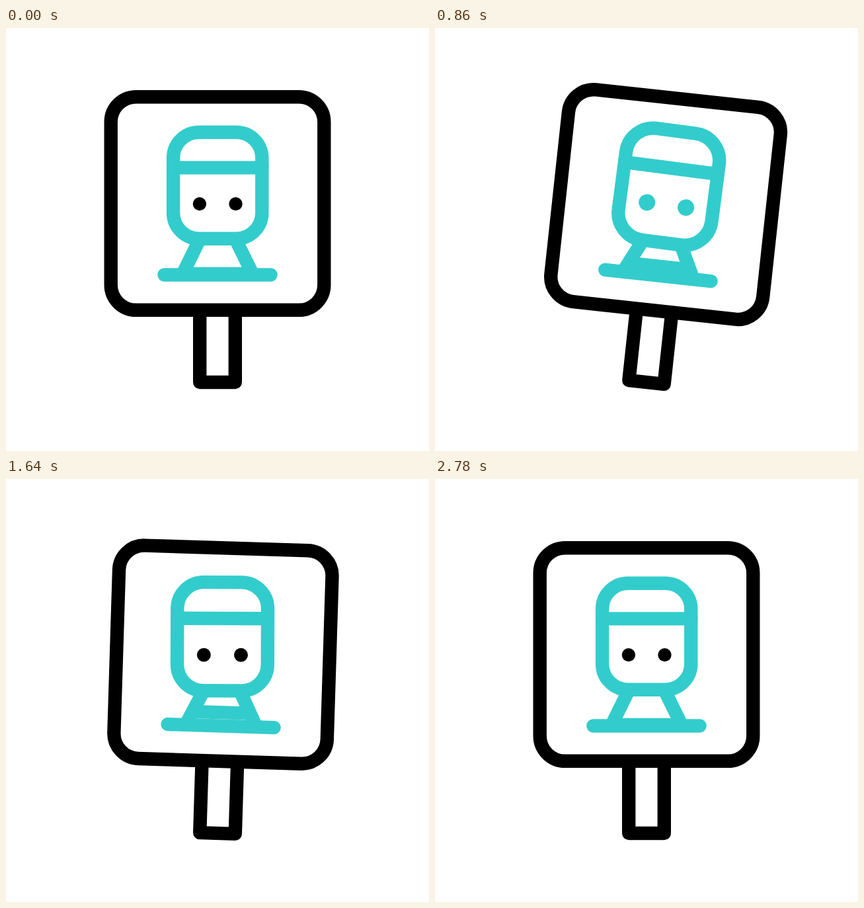
These frames come from a looping animation (640 px wide and 640 px high, 3360 ms). An HTML page:

```html
<!DOCTYPE html>
<html lang="en">
<head>
<meta charset="utf-8">
<title>Train sign</title>
<style>
  html, body { margin: 0; width: 100%; height: 100%; overflow: hidden; background: #fff; }
  svg { display: block; width: 100vw; height: 100vh; }
  .line { fill: none; stroke-width: 20.4; stroke-linejoin: round; }
  .ink { stroke: #000; }
  .teal { stroke: #33cccc; }
  .round { stroke-linecap: round; }
</style>
</head>
<body>
<svg viewBox="0 0 640 640">
  <g id="sign">
    <path class="line ink" d="M293.2 426V536H346.8V426"/>
    <rect class="line ink" x="158.7" y="104.2" width="322.6" height="322.6" rx="38"/>
    <path class="line teal" id="sleeper"/>
    <path class="line teal" d="M293.4 319L266.9 373M347 319L373.5 373"/>
    <path class="line teal round" d="M239.4 373.5H400.6"/>
    <g id="train">
      <rect class="line teal" id="body" style="fill:#fff"/>
      <path class="line teal round" id="sill"/>
      <circle id="eyeL"/>
      <circle id="eyeR"/>
    </g>
  </g>
</svg>
<script>
const LOOP = 3360, STEP = 20, END = 2780;
const CX = 320.2, CY = 238.2;
const $ = id => document.getElementById(id);
const set = (id, attrs) => {
  for (const k in attrs) $(id).setAttribute(k, attrs[k]);
};

// [time, degrees]
const SWING = [[0, 0], [315, 0], [910, 6.3], [1346, -5.1], [1706, 2.45], [1960, -1.5], [2180, 0]];
const WOBBLE = [[0, 0], [260, 1.7], [530, -1.7], [800, 1.7], [1070, -1.7], [1340, 1.7],
  [1610, -1.7], [1880, 1.7], [2150, -1.7], [2420, 1.7], [END, 0]];

const smooth = u => u * u * (3 - 2 * u);

function ease(keys, t) {
  const i = keys.findIndex(k => k[0] > t);
  if (i < 0) return keys[keys.length - 1][1];
  const [t0, a] = keys[i - 1], [t1, b] = keys[i];
  return a + (b - a) * smooth((t - t0) / (t1 - t0));
}

// The sleeper slides from under the train to the rail, six times.
function sleeperY(t) {
  const from = 140, cycle = 415;
  if (t < from || t >= from + 6 * cycle) return 372;
  const u = (t - from) % cycle / cycle;
  return 312 + 60 * u * (1.3 - 0.3 * u);
}

function draw(t) {
  set('sign', { transform: `rotate(${ease(SWING, t)} 320 536)` });
  set('train', { transform: `rotate(${ease(WOBBLE, t)} ${CX} 308)` });

  const y = sleeperY(t), half = 26.8 + (y - 319) * 0.49;
  set('sleeper', { d: `M${CX - half} ${y}H${CX + half}` });

  const grow = t < END ? 0.067 * Math.sin(Math.PI * t / (END / 2)) ** 2 : 0;
  const s = 1 + grow, w = 134.2 * s, h = 161 * s;
  set('body', { x: CX - w / 2, y: CY - h / 2, width: w, height: h, rx: 39 * s });
  set('sill', { d: `M${CX - w / 2} ${CY - 26.8 * s}h${w}` });

  const lit = t >= 480 && t < 1260, e = 1 + 1.5 * grow;
  const eye = { cy: 266.1, r: (lit ? 11.5 : 10.2) * e, fill: lit ? '#33cccc' : '#000' };
  set('eyeL', { cx: CX - 27.3 * e, ...eye });
  set('eyeR', { cx: CX + 27.3 * e, ...eye });
}

const start = performance.now();
function tick() {
  const t = (performance.now() - start) % LOOP;
  draw(Math.floor(t / STEP) * STEP);
  requestAnimationFrame(tick);
}
tick();
</script>
</body>
</html>
```
